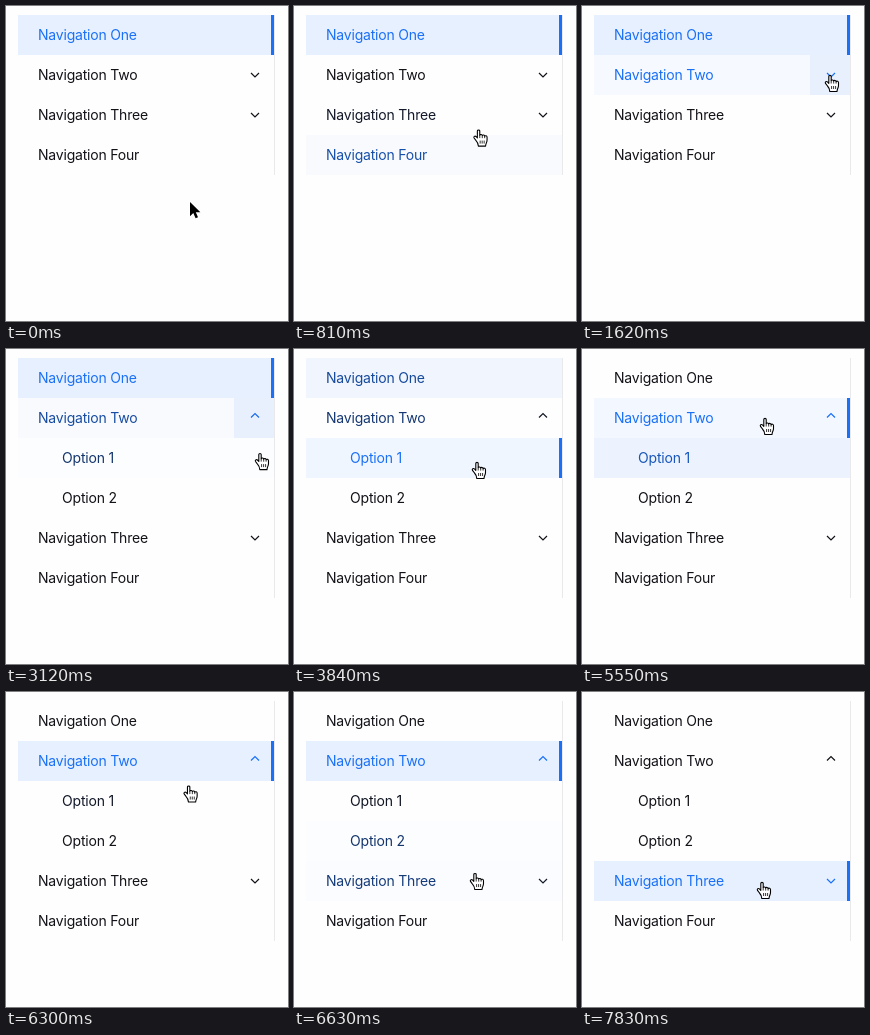
Write an HTML page that moves like this. It is 282 px wide and 315 px high and loops after 8 s.

```html
<!DOCTYPE html>
<html lang="en">
<head>
<meta charset="utf-8">
<title>Navigation menu</title>
<style>
  html, body { margin: 0; width: 100%; height: 100%; overflow: hidden; background: #fefefe; }
  svg { display: block; }
  text { font: 14px Inter, "Liberation Sans", sans-serif; letter-spacing: -.2px; }
</style>
</head>
<body>
<svg id="stage" width="282" height="315"></svg>
<script>
const LOOP = 8000, FADE = 300, OPEN_AT = 2370, ROW = 40, TOP = 9, LEFT = 12, RIGHT = 268;
const INK = [18, 18, 24], BLUE = [26, 112, 246];

// Cursor hot spot: time, x, y
const PATH = [
  [0, 184, 196], [450, 184, 196], [1110, 185, 69], [1320, 185, 69], [1620, 248, 69],
  [1950, 248, 69], [2010, 254, 70], [2940, 254, 70], [3120, 254, 104], [3300, 235, 116],
  [3600, 183, 113], [4500, 183, 113], [5070, 183, 69], [6150, 183, 69], [6630, 181, 181],
  [6930, 180, 190], [8000, 180, 190]
];

const items = [
  { id: 'one', label: 'Navigation One' },
  { id: 'two', label: 'Navigation Two', arrow: true },
  { id: 'opt1', label: 'Option 1', parent: 'two' },
  { id: 'opt2', label: 'Option 2', parent: 'two' },
  { id: 'three', label: 'Navigation Three', arrow: true },
  { id: 'four', label: 'Navigation Four' }
];

const quick = u => { const s = u ** .6; return s * s * (3 - 2 * s); };
const slow = u => u < .5 ? 4 * u ** 3 : 1 - 4 * (1 - u) ** 3;
const mix = (a, b, k) => `rgb(${a.map((v, i) => Math.round(v + (b[i] - v) * k))})`;

// Monotone cubic through the path points
function slope(i, axis) {
  if (!i || i === PATH.length - 1) return 0;
  const d = j => (PATH[j + 1][axis] - PATH[j][axis]) / (PATH[j + 1][0] - PATH[j][0]);
  const a = d(i - 1), b = d(i);
  return a * b <= 0 ? 0 : 2 * a * b / (a + b);
}
function cursor(t) {
  let i = 0;
  while (i < PATH.length - 2 && PATH[i + 1][0] <= t) i++;
  const span = PATH[i + 1][0] - PATH[i][0], u = (t - PATH[i][0]) / span;
  const k = u * u * (3 - 2 * u);
  return [1, 2].map(axis =>
    PATH[i][axis] * (1 - k) + PATH[i + 1][axis] * k +
    span * u * (1 - u) * (slope(i, axis) * (1 - u) - slope(i + 1, axis) * u));
}

const shown = t => items.filter(m => t >= OPEN_AT || !m.parent);
const hovered = t => shown(t)[Math.floor((cursor(t)[1] - TOP) / ROW)];
const selected = t => t < 3765 ? 'one' : t < 5500 ? 'opt1' : t < 7460 ? 'two' : 'three';

// Turns an on/off state over time into a faded level
function track(on) {
  const first = +on(0), flips = [];
  for (let t = 5; t < LOOP; t += 5) if (on(t) !== on(t - 5)) flips.push(t);
  return (t, ease = quick) => {
    let from = first, to = first, start = 0;
    const at = s => from + (to - from) * ease(Math.min(1, (s - start) / FADE));
    for (const f of flips) {
      if (f > t) break;
      from = at(f);
      to = 1 - to;
      start = f;
    }
    return at(t);
  };
}

for (const m of items) {
  const isHover = t => hovered(t) === m;
  const isPicked = t => selected(t) === m.id;
  const holdsPicked = t => items.some(c => c.parent === m.id && selected(t) === c.id);
  m.hover = track(isHover);
  m.picked = track(isPicked);
  m.lit = track(t => isHover(t) || isPicked(t) || holdsPicked(t));
  m.arrowHover = track(t => !!m.arrow && isHover(t) && cursor(t)[0] > 228);
}

const rect = (x, y, w, h, fill, opacity = 1) =>
  `<rect x="${x}" y="${y}" width="${w}" height="${h}" fill="${fill}" opacity="${opacity}"/>`;

function row(m, i, t) {
  const y = TOP + i * ROW, mid = y + 20, w = RIGHT - LEFT;
  let s = rect(LEFT, y, w, ROW, '#f6f9ff', m.hover(t)) +
    rect(LEFT, y, w, ROW, '#e7f0ff', m.picked(t)) +
    rect(228, y, ROW, ROW, '#dfeafe', m.arrowHover(t));
  if (selected(t - 45) === m.id) s += rect(265, y, 3, ROW, mix(BLUE, BLUE, 0));
  s += `<text x="${m.parent ? 56 : 32}" y="${mid + 5}" fill="${mix(INK, BLUE, m.lit(t))}">${m.label}</text>`;
  if (m.arrow) {
    const up = m.id === 'two' && t >= OPEN_AT;
    s += `<path d="M245 ${mid - (up ? .5 : 2)}l4 ${up ? -4 : 4} 4 ${up ? 4 : -4}" fill="none"
      stroke="${mix(INK, BLUE, m.lit(t, slow))}" stroke-width="1.2"/>`;
  }
  return s;
}

const ARROW = `<path d="M0 0v14.2l3.3-3.1 2.3 5.2 2.4-1-2.2-5h4.6z" stroke="#fff" stroke-width="1.6" paint-order="stroke"/>`;
const HAND = `<g fill="#fff" stroke="#000" stroke-width="1.1" stroke-linejoin="round">
  <path d="M-2.5 11-4.5 8.4C-5.3 7-3.6 6-2.6 6.9L-1.2 8.3V1.6C-1.2 0 1.2 0 1.2 1.6V5.6C1.6 4.6 3.6 4.8 3.7 6
    4.3 5 6 5.4 6.1 6.6 6.8 5.8 8.5 6.2 8.5 7.6V10.5C8.5 13 7.2 13.5 7 16.5H-.2C-.3 14-1 12.6-2.5 11z"/>
  <path d="M1.2 5.5v3M3.7 6v2.6M6.1 6.6v2M1.6 11v3M3.6 11v3M5.6 11v3" stroke-width=".8"/></g>`;

const stage = document.getElementById('stage');
function draw(now) {
  const t = now % LOOP, rows = shown(t), [x, y] = cursor(t);
  stage.innerHTML = rect(RIGHT, TOP, 1, rows.length * ROW, '#e9e9ec') +
    rows.map((m, i) => row(m, i, t)).join('') +
    `<g transform="translate(${x} ${y})">${hovered(t) ? HAND : ARROW}</g>`;
  requestAnimationFrame(draw);
}
draw(performance.now());
</script>
</body>
</html>
```
